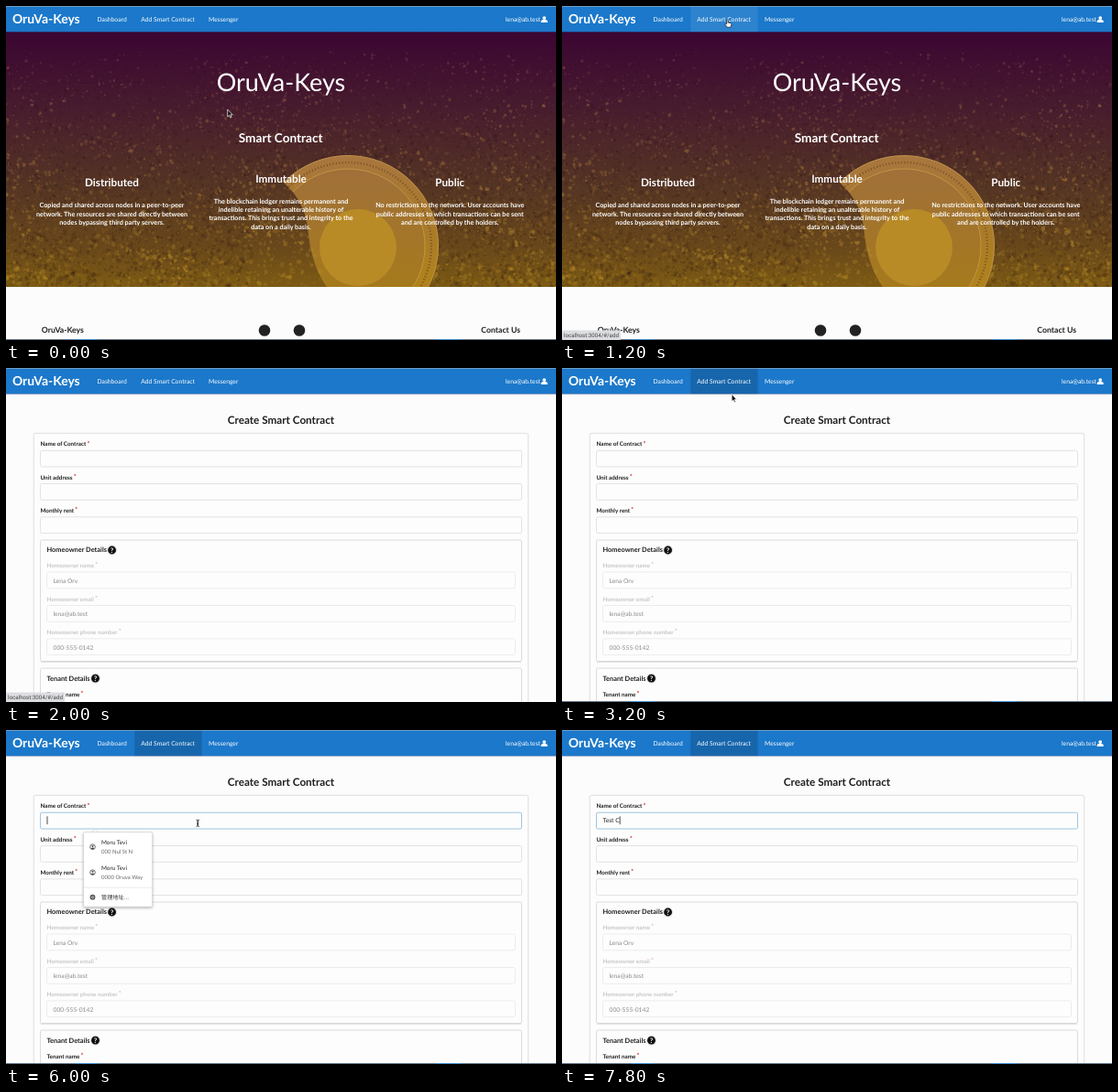
Recreate the animation shown at these times as an HTML page with a canvas. Size 600 by 365 pixels, loop 8 s.

```html
<!DOCTYPE html>
<html lang="en">
<head>
<meta charset="utf-8">
<title>Smart Contract</title>
<style>
html, body { margin: 0; width: 100%; height: 100%; overflow: hidden; background: #fcfcfc; }
canvas, svg { position: absolute; left: 0; top: 0; width: 600px; height: 365px; }
svg { font-family: Lato, sans-serif; text-rendering: geometricPrecision; }
text { white-space: pre; }
</style>
</head>
<body>
<canvas id="photo" width="600" height="365"></canvas>
<svg id="stage" viewBox="0 0 600 365"></svg>
<script>
const LOOP = 8000, STEP = 200;
const BRAND = 'OruVa-Keys', EMAIL = 'lena@ab.test';
const INK = '#1f1f1f';

// ---------- markup helpers ----------
const text = (x, y, size, str, { fill = INK, weight = 400, anchor = 'start', more = '' } = {}) =>
  `<text x="${x}" y="${y}" font-size="${size}" fill="${fill}" font-weight="${weight}" text-anchor="${anchor}" ${more}>${str}</text>`;
const bold = (x, y, size, str, opts = {}) => text(x, y, size, str, { weight: 700, ...opts });
const rect = (x, y, w, h, fill, more = '') =>
  `<rect x="${x}" y="${y}" width="${w}" height="${h}" fill="${fill}" ${more}/>`;
const group = (id, content) => `<g id="${id}">${content}</g>`;
const box = (x, y, w, h, stroke = '#dcdcdd', id = '') =>
  rect(x, y, w, h, '#fdfdfd', `rx="1.8" stroke="${stroke}" stroke-width=".8" ${id && `id="${id}"`}`);

const whiteMid = { fill: '#fff', anchor: 'middle' };
const column = (x, y, title, lines) =>
  bold(x, y, 11.7, title, whiteMid) +
  lines.map((line, i) => bold(x, y + 23 + i * 9.4, 7.2, line, whiteMid)).join('');

const label = (x, y, str, disabled) =>
  `<text x="${x}" y="${y}" font-size="6.3" font-weight="700" fill="${disabled ? '#c6c6c6' : INK}">${str}` +
  `<tspan dx="1.2" dy="-.6" font-size="7" fill="${disabled ? '#efb5b5' : '#db2828'}">*</tspan></text>`;
const field = (y, name, id) => label(37.5, y, name) + box(37.5, y + 4.8, 525, 17.8, undefined, id);
const lockedField = (y, name, value) =>
  label(44.5, y, name, true) + box(44.5, y + 5, 511, 17.8, '#e9e9ea') +
  text(51.5, y + 16.7, 6.7, value, { fill: '#8b8b8b' });
const help = (x, y) =>
  `<circle cx="${x}" cy="${y}" r="5.2" fill="#d2d2d2"/><circle cx="${x}" cy="${y}" r="4.4" fill="#111"/>` +
  bold(x, y + 2.7, 7.6, '?', whiteMid);

const person = (x, y) =>
  `<g fill="none" stroke="#444" stroke-width=".8"><circle cx="${x}" cy="${y}" r="2.8"/></g>` +
  `<circle cx="${x}" cy="${y - .8}" r="1" fill="#444"/><path d="M${x - 1.9} ${y + 1.8}q1.9-2 3.8 0l-1.9 .9z" fill="#444"/>`;
const suggestion = (y, name, address) =>
  person(94.5, y) + text(104, y - 2.6, 6.4, name, { fill: '#222' }) +
  text(104, y + 6.9, 6, address, { fill: '#666' });

// ---------- scene ----------
const nav =
  rect(0, 0, 600, 28.3, '#1b78ca') + rect(0, 0, 600, .8, '#86a9c8') +
  rect(140.3, .8, 73.3, 27.5, '#fff', 'id="hover" opacity=".08"') +
  rect(140.3, .8, 73.3, 27.5, '#000', 'id="active" opacity=".15"') +
  bold(7, 18.5, 13.9, BRAND, { fill: '#fff' }) +
  [[99.5, 'Dashboard'], [147.3, 'Add Smart Contract'], [221, 'Messenger']]
    .map(([x, str]) => text(x, 17, 6.75, str, { fill: '#fff' })).join('') +
  text(583, 17, 6.75, EMAIL, { fill: '#fff', anchor: 'end' }) +
  '<circle cx="587.2" cy="13.1" r="1.9" fill="#fff"/><path d="M583.7 18v-1.2q0-1.9 2-1.9h3q2 0 2 1.9v1.2z" fill="#fff"/>';

const home =
  text(300, 93, 27, BRAND, whiteMid) +
  bold(299.7, 149, 13.6, 'Smart Contract', whiteMid) +
  column(115.5, 197.3, 'Distributed', [
    'Copied and shared across nodes in a peer-to-peer',
    'network. The resources are shared directly between',
    'nodes bypassing third party servers.']) +
  column(300, 192.6, 'Immutable', [
    'The blockchain ledger remains permanent and',
    'indelible retaining an unalterable history of',
    'transactions. This brings trust and integrity to the',
    'data on a daily basis.']) +
  column(484.3, 197.3, 'Public', [
    'No restrictions to the network. User accounts have',
    'public addresses to which transactions can be sent',
    'and are controlled by the holders.']) +
  bold(38.8, 357, 8.7, BRAND) + bold(561, 357, 8.7, 'Contact Us', { anchor: 'end' }) +
  '<circle cx="282" cy="354.5" r="6.3" fill="#222"/><circle cx="320" cy="354.5" r="6.3" fill="#222"/>';

const form =
  rect(0, 28.3, 600, 337, '#fcfcfc') +
  bold(300, 61.3, 11.7, 'Create Smart Contract', { anchor: 'middle' }) +
  box(30.3, 71.3, 539.4, 320, '#d9d9da') +
  field(85.4, 'Name of Contract', 'nameBox') + field(121.7, 'Unit address') + field(158, 'Monthly rent') +
  rect(38, 320.5, 524, 1.2, '#d8d8d8') + box(37.5, 188, 525, 132.5, '#d4d4d5') +
  bold(44.5, 201.3, 7.4, 'Homeowner Details') + help(115.6, 199) +
  lockedField(218, 'Homeowner name', 'Lena Orv') +
  lockedField(254.5, 'Homeowner email', EMAIL) +
  lockedField(290.8, 'Homeowner phone number', '000-555-0142') +
  box(37.5, 328, 525, 80, '#d4d4d5') +
  bold(44.5, 341.6, 7.4, 'Tenant Details') + help(97.5, 339.2) +
  label(44.5, 358.6, 'Tenant name') +
  `<text id="typed" x="44.5" y="101.3" font-size="6.7" fill="#222"></text>` +
  rect(44.6, 94.3, .8, 8.8, '#222', 'id="caret"');

const popup =
  '<path d="M93 112l4-3.5 4 3.5" fill="#fff" stroke="#ccc" stroke-width=".5"/>' +
  rect(84.6, 111.8, 75, 81.4, '#fff',
    'rx="1.5" stroke="#c9c9c9" stroke-width=".5" style="filter:drop-shadow(0 1px 1.5px rgba(0,0,0,.3))"') +
  suggestion(127.7, 'Moru Tevi', '000 Nul St N') + suggestion(155.6, 'Moru Tevi', '0000 Oruva Way') +
  rect(84.6, 171.8, 75, .6, '#ddd') +
  '<circle cx="94.5" cy="182.7" r="2.9" fill="#555"/><circle cx="94.5" cy="182.7" r="1.1" fill="#555" stroke="#fff" stroke-width=".6"/>' +
  text(104, 185.2, 6.2, '管理地址...', { fill: '#333', more: 'font-family="Noto Sans CJK SC, Noto Sans CJK, sans-serif"' });

const bottomEdge = rect(0, 364, 600, 1, '#66788a') +
  rect(75, 364, 25, 1, '#3f8fcf') + rect(470, 364, 27, 1, '#3f8fcf');

const statusBar = rect(0, 354.6, 64, 10.4, '#dcdde0', 'rx="1"') +
  text(2, 361.8, 6.2, 'localhost:3004/#/add', { fill: '#444', more: 'font-family="Roboto, sans-serif"' });

const pointers =
  group('arrow', '<path d="M0 0v8l1.8-1.6 1.2 2.7 1.3-.6-1.2-2.6h2.4z" fill="#111" stroke="#fff" stroke-width=".7"/>') +
  group('hand', '<path d="M-.7 4.6V.6q.7-1 1.4 0v2.5l3 .7q.8.3.6 1.5l-.7 2.9H-.4L-2.5 5.2q.4-1.1 1.8-.6z" fill="#fff" stroke="#111" stroke-width=".7"/>') +
  group('beam', '<path d="M-1.7-3.6q1.7 0 1.7 1v5.2q0 1-1.7 1M1.7-3.6q-1.7 0-1.7 1v5.2q0 1 1.7 1M-.8 .9h1.6" fill="none" stroke="#222" stroke-width=".85"/>');

document.getElementById('stage').innerHTML =
  group('home', home) + group('form', form) + nav + group('popup', popup) +
  group('edge', bottomEdge) + group('status', statusBar) + group('pointer', pointers);

// ---------- backdrop: soil fading from violet to gold, with a half-buried coin ----------
function paintPhoto() {
  const ctx = document.getElementById('photo').getContext('2d');
  let seed = 17;
  const random = () => (seed = (seed * 16807) % 2147483647) / 2147483647;
  const gradient = (x0, y0, x1, y1, stops) => {
    const fill = ctx.createLinearGradient(x0, y0, x1, y1);
    stops.forEach(([at, color]) => fill.addColorStop(at, color));
    return fill;
  };
  const soil = gradient(0, 28, 0, 307,
    [[0, '#3b0532'], [.3, '#471c2e'], [.6, '#543424'], [.85, '#69481a'], [1, '#7d5b14']]);

  const speckle = (count, area, light) => {
    for (let i = 0; i < count; i++) {
      const [x, y] = area(), depth = (y - 28) / 279;
      const clump = .5 + .5 * Math.sin(x * .035 + Math.sin(y * .06) * 2) * Math.cos(y * .05 + x * .011);
      const size = .4 + random() ** 3 * (1 + depth);
      const alpha = (light ? .08 + .4 * clump : .22) * (.4 + random() * .6);
      ctx.fillStyle = light
        ? `rgba(${150 + depth * 55}, ${95 + depth * 65}, ${90 - depth * 50}, ${alpha})`
        : `rgba(30, 10, 18, ${alpha})`;
      ctx.beginPath();
      ctx.ellipse(x, y, size * 1.3, size, random() * 3, 0, 7);
      ctx.fill();
    }
  };
  const disc = (x, y, r, fill, stroke, width = 1) => {
    ctx.beginPath();
    ctx.arc(x, y, r, 0, 7);
    if (fill) { ctx.fillStyle = fill; ctx.fill(); }
    if (stroke) { ctx.strokeStyle = stroke; ctx.lineWidth = width; ctx.stroke(); }
  };

  ctx.beginPath();
  ctx.rect(0, 28, 600, 279);
  ctx.clip();
  ctx.fillStyle = soil;
  ctx.fillRect(0, 28, 600, 279);
  speckle(6000, () => [random() * 600, 45 + 262 * Math.sqrt(random())], false);
  speckle(6500, () => [random() * 600, 50 + 257 * random() ** .75], true);

  const cx = 373, cy = 262;
  disc(cx, cy, 98.5, gradient(cx, 163, cx, 307, [[0, '#a8763f'], [.5, '#a97a2a'], [1, '#b0831a']]), '#c4944a');
  ctx.setLineDash([1.2, 2.2]);
  disc(cx, cy, 91, null, '#80572a', 2.5);
  ctx.setLineDash([]);
  disc(cx, cy, 84, gradient(cx, 178, cx, 307, [[0, '#a0703a'], [1, '#a57a1c']]), '#c39448');
  disc(384, 264, 42, '#b98b27');

  // loose soil piled over the coin's left side
  ctx.beginPath();
  ctx.moveTo(270, 190);
  ctx.lineTo(303, 193);
  ctx.quadraticCurveTo(328, 215, 330, 250);
  ctx.quadraticCurveTo(334, 285, 350, 307);
  ctx.lineTo(270, 307);
  ctx.fillStyle = soil;
  ctx.fill();
  speckle(450, () => {
    const y = 195 + random() * 112;
    return [270 + random() * (38 + (y - 195) * .4), y];
  }, true);
}

// ---------- timeline ----------
const el = id => document.getElementById(id);
const between = (t, from, to) => t >= from && t < to;
const show = (id, on) => { el(id).style.display = on ? '' : 'none'; };

// time, x, y
const PATH = [
  [0, 241.7, 113], [200, 241.7, 113], [800, 178.8, 14], [1000, 180.5, 15],
  [3000, 180.5, 15], [3800, 210, 101.8], [4400, 210, 101.8], [5000, 209.2, 101.8], [LOOP, 209.2, 101.8]
];
function pointerAt(t) {
  const i = PATH.findIndex(([time]) => time > t);
  const [t0, x0, y0] = PATH[i - 1], [t1, x1, y1] = PATH[i];
  const u = (t - t0) / (t1 - t0), e = u * u * (3 - 2 * u);
  return [x0 + (x1 - x0) * e, y0 + (y1 - y0) * e];
}

const CLICK = 2000, FOCUS = 5000, TYPING = 6800;
function render(now) {
  const t = Math.floor((now % LOOP) / STEP) * STEP;
  const onForm = t >= CLICK, focused = t >= FOCUS, typing = t >= TYPING;
  const [x, y] = pointerAt(t);

  show('home', !onForm);
  show('form', onForm);
  show('hover', between(t, 1000, CLICK));
  show('active', t >= 2200);
  show('status', between(t, 1200, 2600));
  show('edge', !between(t, CLICK, 2400));
  show('popup', focused && !typing);

  el('pointer').setAttribute('transform', `translate(${x} ${y})`);
  show('pointer', !between(t, CLICK, 2600) && !typing);
  const overField = onForm && y > 90;
  const overLink = between(t, 1000, 3200);
  show('beam', overField);
  show('hand', overLink);
  show('arrow', !overField && !overLink);

  el('nameBox').setAttribute('stroke', focused ? '#85b7d9' : '#dcdcdd');
  el('typed').textContent = typing ? 'Test C'.slice(0, 1 + (t - TYPING) / STEP) : '';
  show('caret', focused && (typing || (t - FOCUS) % 1000 < 500));
  el('caret').setAttribute('x', 44.6 + el('typed').getComputedTextLength());
}

paintPhoto();
const start = performance.now();
function tick() {
  render(performance.now() - start);
  requestAnimationFrame(tick);
}
tick();
</script>
</body>
</html>
```
